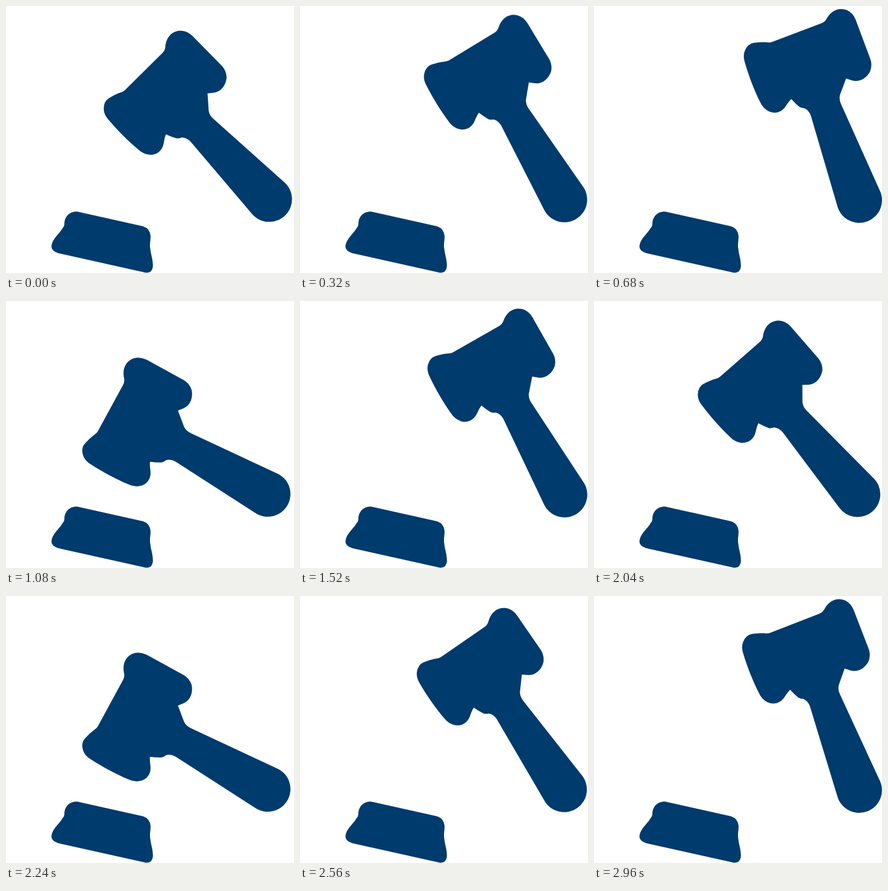
Animation, 498 px wide and 463 px high, one loop 3 s. Source, as an HTML page:

```html
<!DOCTYPE html>
<html lang="en">
<head>
<meta charset="utf-8">
<title>Gavel</title>
<style>
  html, body { margin: 0; width: 100%; height: 100%; overflow: hidden; background: #fff; }
  svg { display: block; width: 100%; height: 100%; }
</style>
</head>
<body>
<svg viewBox="0 0 498 463" fill="#003b6d">
  <path d="M101 378C101 365 110 356 123 356.500L237 382Q249 386 250 399C250 408 248 413 249.500 421C251 434 254 438 254 451Q253 463 242 462.500L90 428.500Q79 425 78.500 417C80 403 91 397 98 385Q101 382 101 378Z"/>
  <path id="gavel" d="M270.500 81.500Q275 77 275.500 71C277 53 288 43 302 42.700Q313 43 322 51.500L373.500 104Q381 112 381.500 124C380 139 371 149 359 150.500L348.500 151.500L350.500 182Q352 190 359 196L480 304.500A39.300 39.300 0 1 1 424.500 359.500L319 235Q312 228 304 228Q299 230 295 229.500Q286 227 276.500 222.500C274 229 273.500 234 272.500 239C270 251 261 258 250 258Q238 257.500 229 249C211 234 193 216 177 197Q169 188 169 178Q169 166 177 160.500C184 156 192 152 198 150Q202 149 205 146.500Z"/>
</svg>
<script>
  const LOOP = 3000, STEP = 40, SWING = 1160;
  const PIVOT = "453 344";
  const gavel = document.getElementById("gavel");

  // Time, angle, and the easing handles leading to the next key.
  const keys = [
    { t: 0, angle: 0, ease: [.167, .167, .667, 1] },
    { t: 760, angle: 24.6, ease: [.333, 0, .833, .833] },
    { t: 1000, angle: -33.6, ease: [.167, .167, .833, .833] },
    { t: SWING, angle: 0 }
  ];

  function bezier(a, b, s) {
    const r = 1 - s;
    return 3 * r * r * s * a + 3 * r * s * s * b + s * s * s;
  }

  function ease([x1, y1, x2, y2], u) {
    let low = 0, high = 1;
    for (let i = 0; i < 24; i++) {
      const mid = (low + high) / 2;
      if (bezier(x1, x2, mid) < u) low = mid; else high = mid;
    }
    return bezier(y1, y2, low);
  }

  function angleAt(time) {
    const t = time % SWING;
    const i = keys.findIndex(key => t < key.t) - 1;
    const from = keys[i], to = keys[i + 1];
    const u = (t - from.t) / (to.t - from.t);
    return from.angle + (to.angle - from.angle) * ease(from.ease, u);
  }

  function draw(time) {
    const t = Math.floor((time % LOOP) / STEP) * STEP;
    gavel.setAttribute("transform", `rotate(${angleAt(t).toFixed(3)} ${PIVOT})`);
  }

  const start = performance.now();
  function tick() {
    draw(performance.now() - start);
    requestAnimationFrame(tick);
  }
  tick();
</script>
</body>
</html>
```
